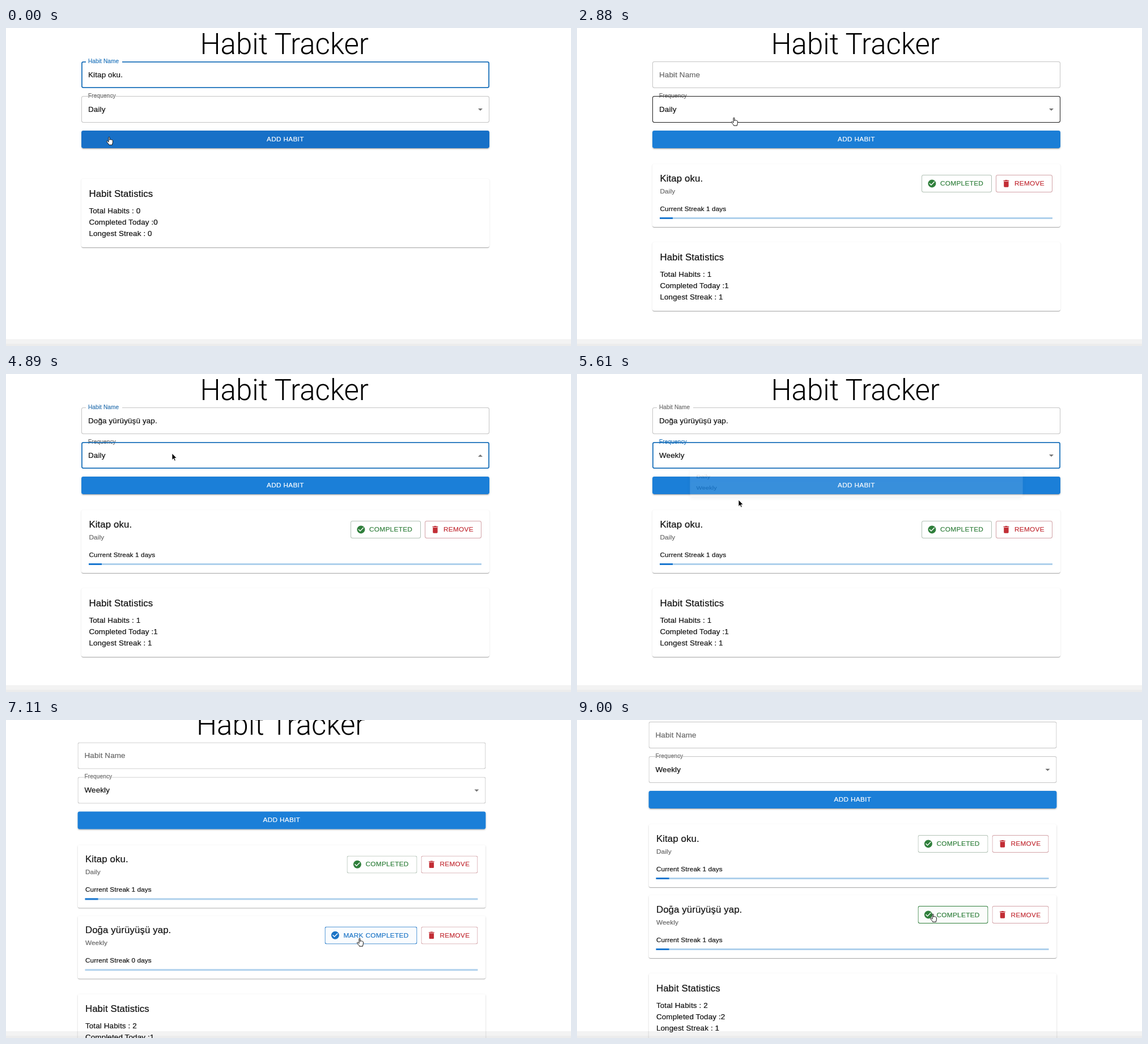
An HTML page for the animation above (9.6 s loop, 997x561 px).

```html
<!DOCTYPE html>
<html lang="en">
<head>
<meta charset="utf-8">
<title>Habit Tracker</title>
<style>
  html, body { margin: 0; width: 100%; height: 100%; overflow: hidden; background: #fff; }
  body { position: relative; font-family: "Liberation Sans", Arial, sans-serif; color: #101010; letter-spacing: .126px; }
  div, svg { position: absolute; }
  .text { line-height: 20px; margin-top: -10px; white-space: pre; -webkit-text-stroke: .2px currentColor; }
  .title { color: #000; font-family: Roboto, sans-serif; font-weight: 300; letter-spacing: 0; -webkit-text-stroke: 0; }
  .muted { color: #666; }
  .caps { letter-spacing: .336px; }
  .box { left: 133px; width: 720px; height: 47px; border-radius: 3.4px; }
  .card { left: 133px; width: 720px; border-radius: 3.4px; background: #fff;
    box-shadow: 0 1.7px .8px -.8px #0003, 0 .8px .8px #00000024, 0 .8px 2.5px #0000001f; }
  .button { height: 31px; border-radius: 3.4px; overflow: hidden; }
  .button svg { left: 10px; top: 7px; width: 16.8px; height: 16.8px; fill: currentColor; }
  .ripple { border-radius: 50%; background: currentColor; }
  .remove { left: 606px; top: 19.7px; width: 100px; color: #c22d35; box-shadow: inset 0 0 0 1px #d3a3a8; }
  .track { left: 13.4px; top: 94.2px; width: 693px; height: 3.4px; background: #aed0ec; }
  .fill { left: 0; top: 0; height: 100%; background: #1b78d0; }
  #add { left: 133px; top: 181px; width: 720px; color: #fff; }
  #addShadow { left: 133px; top: 181px; width: 720px; height: 31px; border-radius: 3.4px;
    box-shadow: 0 2.5px .8px -1.7px #0003, 0 1.7px 1.7px #00000024, 0 .8px 4.2px #0000001f; }
  #page { left: 0; top: 0; width: 997px; height: 700px; }
  #notch { left: 141px; top: 57px; height: 5px; background: #fff; }
  #nameLabel { left: 145px; font-size: 13.44px; transform-origin: 0 50%; }
  #caret { display: inline-block; position: relative; width: 1px; height: 15px; vertical-align: -3px; background: #222; }
  #arrow { left: 832.8px; top: 141.9px; border: 4.2px solid transparent; border-top-color: #757575; border-bottom: 0; }
  #menu { left: 133px; top: 167px; width: 720px; height: 74px; border-radius: 3.4px; background: #fff; transform-origin: 50% 0;
    box-shadow: 0 4.2px 4.2px -2.5px #0003, 0 6.7px 8.4px .8px #00000024, 0 2.5px 11.8px 1.7px #0000001f; }
  .item { left: 0; width: 100%; height: 30.2px; }
  #bar { left: 0; top: 549px; width: 100%; height: 8px; background: #0000000c; background-clip: padding-box; border-bottom: 4px solid #00000013; }
  #cursor { left: 0; top: 0; width: 24px; height: 24px; overflow: visible; }
</style>
</head>
<body>
<div id="page"></div>
<div id="bar"></div>
<svg id="cursor">
  <path id="hand" fill="#fff" stroke="#111" d="M-1 .9C-1 0 1 0 1 1.1V5.7l.3-.9c.6-.6 1.6-.3 1.8.4.5-.6 1.6-.3 1.8.5.6-.4 1.5 0 1.5.9V9.7c0 2-1 2.6-1 4.5H-.4C-.5 12.3-3.5 10.5-4.4 8.3-4.8 7.1-3.4 6.7-2.5 7.7L-1 9.2z"/>
  <path id="pointer" fill="#000" stroke="#fff" stroke-width=".8" d="M0 0V11.6L2.7 9.2 4.4 13.2 6.3 12.4 4.6 8.5H8.2Z"/>
  <path id="beam" fill="none" stroke="#222" d="M-2.5-6Q0-6 0-4Q0-6 2.5-6M0-4V5M-2.5 7Q0 7 0 5Q0 7 2.5 7"/>
</svg>
<script>
const LOOP = 9600;
const BLUE = '#1b7fd8', DARK_BLUE = '#1770c7', OUTLINE_BLUE = '#1a70ba', GREEN = '#2f7f3b';
const CHECK = 'M12 2a10 10 0 1 0 0 20 10 10 0 0 0 0-20zM10 17l-5-5 1.4-1.4 3.6 3.6 7.6-7.6L19 8z';
const TRASH = 'M6 19c0 1.1.9 2 2 2h8c1.1 0 2-.9 2-2V7H6zM19 4h-3.5l-1-1h-5l-1 1H5v2h14z';

// Event times in ms
const ADD = [180, 6250];
const DONE = [1720, 8400];
const NAME_FOCUS = 3130, TYPE_START = 3350, TYPE_END = 4450;
const SELECT_FOCUS = 4860, PICK = 5500;
const SCROLL_START = 6990, SCROLL_END = 7530;
const NEW_HABIT = 'Doğa yürüyüşü yap.';
const CARD_TOP = [239.5, 364.8], STATS_TOP = [266, 378, 503];

const cursorPath = [
  [0, 182, 192], [500, 182, 192], [1470, 641, 285], [1600, 645, 274], [2100, 645, 274],
  [2880, 277, 158], [3080, 250, 84], [4550, 250, 84], [4800, 293, 140], [5100, 293, 140],
  [5450, 285, 222], [5700, 285, 222], [6050, 300, 193], [6450, 300, 193], [7050, 624, 385],
  [7890, 624, 385], [8300, 628, 342], [LOOP, 628, 342]
];

const $ = id => document.getElementById(id);
const clamp = v => Math.max(0, Math.min(1, v));
const ramp = (t, from, length) => clamp((t - from) / length);
const pulse = (t, from, to, length) => clamp(ramp(t, from, length) - ramp(t, to, length));
const smooth = u => u * u * (3 - 2 * u);
const mix = (a, b, u) => `color-mix(in srgb, ${b} ${u * 100}%, ${a})`;
const show = (el, on) => { el.style.display = on ? '' : 'none'; };
const outline = (color, width = 1) => `inset 0 0 0 ${width}px ${color}`;

const text = (x, y, size, content, attrs = '', kind = '') =>
  `<div class="text ${kind}" ${attrs} style="left:${x}px;top:${y}px;font-size:${size}px">${content}</div>`;
const caps = (x, content, attrs) => text(x, 15.3, 11.76, content, attrs, 'caps');
const icon = d => `<svg viewBox="0 0 24 24"><path d="${d}"/></svg>`;

const habitCard = (name, frequency, i) => `
  <div class="card" id="card${i}" style="top:${CARD_TOP[i]}px;height:111.5px">
    ${text(13.4, 26.7, 16.8, name)}
    ${text(13.4, 48.7, 11.76, frequency, '', 'muted')}
    ${text(13.4, 79, 11.76, '', `id="streak${i}"`)}
    <div class="button" id="mark${i}" style="right:121px;top:19.7px">
      ${icon(CHECK)}${caps(33, '', `id="markText${i}"`)}<div class="ripple" id="markRipple${i}"></div>
    </div>
    <div class="button remove">${icon(TRASH)}${caps(33, 'REMOVE')}</div>
    <div class="track"><div class="fill" id="fill${i}"></div></div>
  </div>`;

$('page').innerHTML = `
  ${text(342.5, 29, 51, 'Habit Tracker', '', 'title')}
  <div class="box" id="nameBox" style="top:59px"></div>
  <div id="notch"></div>
  <div class="text" id="nameLabel">Habit Name</div>
  ${text(145, 83, 13.44, '<span id="nameText"></span><span id="caret"></span>')}
  ${text(145, 120, 10.08, 'Frequency', 'id="frequencyLabel"')}
  <div class="box" id="selectBox" style="top:120px"></div>
  ${text(145, 144, 13.44, '', 'id="frequency"')}
  <div id="arrow"></div>
  <div id="addShadow"></div>
  <div class="button" id="add">${caps(327, 'ADD HABIT')}<div class="ripple" id="addRipple"></div></div>
  ${habitCard('Kitap oku.', 'Daily', 0)}
  ${habitCard(NEW_HABIT, 'Weekly', 1)}
  <div class="card" id="stats" style="height:121px">
    ${text(13.4, 27, 16.8, 'Habit Statistics')}
    ${[0, 1, 2].map(i => text(13.4, 57 + i * 20.2, 13.44, '', `id="stat${i}"`)).join('')}
  </div>
  <div id="menu">
    <div class="item" style="top:6.7px;background:#e8f2fb">${text(13.4, 15.1, 13.44, 'Daily')}</div>
    <div class="item" id="weekly" style="top:36.9px">${text(13.4, 15.1, 13.44, 'Weekly')}</div>
  </div>`;

function cursorAt(t) {
  const i = cursorPath.findIndex(key => key[0] > t);
  const [t0, x0, y0] = cursorPath[i - 1], [t1, x1, y1] = cursorPath[i];
  const u = smooth((t - t0) / (t1 - t0));
  return [x0 + (x1 - x0) * u, y0 + (y1 - y0) * u];
}

function drawRipple(el, age, x, y, reach) {
  const r = reach * (1 - (1 - ramp(age, 0, 550)) ** 2);
  show(el, age >= 0 && age < 700);
  Object.assign(el.style, {
    left: x - r + 'px', top: y - r + 'px', width: 2 * r + 'px', height: 2 * r + 'px',
    opacity: .28 * (1 - ramp(age, 150, 500))
  });
}

function drawForm(t, target) {
  const nameFocused = t < ADD[0] - 60 || (t >= NAME_FOCUS && t < SELECT_FOCUS);
  const selectFocused = t >= SELECT_FOCUS && t < ADD[1] - 60;
  const typed = Math.floor(NEW_HABIT.length * ramp(t, TYPE_START, TYPE_END - TYPE_START));
  $('nameText').textContent = t < ADD[0] ? 'Kitap oku.' : t < ADD[1] ? NEW_HABIT.slice(0, typed) : '';
  const typing = t > TYPE_START && t < TYPE_END;
  show($('caret'), t >= NAME_FOCUS && t < SELECT_FOCUS && (typing || (t - NAME_FOCUS) % 1000 < 500));

  const shrink = smooth(clamp(1 - ramp(t, ADD[0], 200) + pulse(t, NAME_FOCUS, ADD[1], 200)));
  const label = $('nameLabel').style;
  label.top = 82.5 - 23.5 * shrink + 'px';
  label.transform = `scale(${1 - .25 * shrink})`;
  label.color = mix('#666', OUTLINE_BLUE, clamp(1 - ramp(t, ADD[0] - 60, 200) + pulse(t, NAME_FOCUS, SELECT_FOCUS, 200)));
  $('notch').style.width = 64 * shrink + 'px';

  const border = (focused, hovered) =>
    focused ? outline(OUTLINE_BLUE, 1.8) : outline(hovered ? '#1c1c1c' : '#c4c4c4');
  $('nameBox').style.boxShadow = border(nameFocused, target === 'name');
  $('selectBox').style.boxShadow = border(selectFocused, target === 'select');
  $('frequencyLabel').style.color = mix('#666', OUTLINE_BLUE, pulse(t, SELECT_FOCUS + 30, ADD[1] - 60, 200));
  $('frequency').textContent = t < PICK ? 'Daily' : 'Weekly';
  $('arrow').style.transform = t >= SELECT_FOCUS && t < PICK ? 'rotate(180deg)' : '';

  const hover = clamp(1 - ramp(t, 790, 250) + pulse(t, 2505, 2655, 250) + pulse(t, 5850, 6600, 250));
  $('add').style.background = mix(BLUE, DARK_BLUE, hover);
  const press = t < 3000 ? ADD[0] : ADD[1];
  drawRipple($('addRipple'), t - press + 60, press === ADD[0] ? 49 : 167, 12, 680);

  const closing = ramp(t, PICK, 150);
  const grown = t < PICK ? smooth(ramp(t, SELECT_FOCUS + 30, 210)) : 1 - closing;
  const scale = .75 + .25 * grown;
  $('menu').style.transform = `scale(${scale}, ${scale * scale})`;
  $('menu').style.opacity = t < PICK ? grown : grown ** 1.5;
  $('weekly').style.background = t > 5330 ? '#f5f5f5' : '';
}

function drawCard(i, t) {
  const done = t >= DONE[i];
  show($('card' + i), t >= ADD[i]);
  $('streak' + i).textContent = `Current Streak ${done ? 1 : 0} days`;
  $('fill' + i).style.width = 693 / 30 * ramp(t, DONE[i], 400) + 'px';
  $('markText' + i).textContent = done ? 'COMPLETED' : 'MARK COMPLETED';
  const hover = i ? clamp(pulse(t, 6850, 7250, 200) + ramp(t, 8080, 250)) : pulse(t, 1470, 2190, 250);
  const color = done ? GREEN : '#1b74c6';
  Object.assign($('mark' + i).style, {
    width: done ? '124px' : '163px',
    color,
    background: mix('#fff', color, hover * .02),
    boxShadow: outline(mix(done ? '#b3c2b6' : '#aec5da', color, hover))
  });
  drawRipple($('markRipple' + i), t - DONE[i] + 60, i ? 26 : 37, 14, 115);
}

function targetAt(x, y, t) {
  const inside = (left, top, right, bottom) => x >= left && x <= right && y >= top && y <= bottom;
  if (t >= SELECT_FOCUS && t < 5650) return '';
  if (inside(133, 59, 853, 106)) return 'name';
  if (inside(133, 120, 853, 167)) return 'select';
  if (inside(133, 181, 853, 212)) return 'button';
  const onCard = CARD_TOP.some((top, i) => t >= ADD[i] &&
    (inside(t < DONE[i] ? 569 : 608, top + 19.5, 732, top + 51) || inside(739, top + 19.5, 839, top + 51)));
  return onCard ? 'button' : '';
}

function render(t) {
  const shift = t >= ADD[1] ? -6.5 : 0;
  const scroll = 56 * (1 - (1 - ramp(t, SCROLL_START, SCROLL_END - SCROLL_START)) ** 1.7);
  $('page').style.transform = `translate(${shift}px, ${-scroll}px)`;

  const [x, y] = cursorAt(t);
  const target = targetAt(x - shift, y + scroll, t);
  drawForm(t, target);
  drawCard(0, t);
  drawCard(1, t);

  const habits = ADD.filter(time => t >= time).length;
  const completed = DONE.filter(time => t >= time).length;
  $('stats').style.top = STATS_TOP[habits] + 'px';
  $('stat0').textContent = `Total Habits : ${habits}`;
  $('stat1').textContent = `Completed Today :${completed}`;
  $('stat2').textContent = `Longest Streak : ${Math.min(1, completed)}`;

  $('cursor').style.transform = `translate(${x}px, ${y}px)`;
  show($('cursor'), t < TYPE_START || t > 4550);
  show($('hand'), target === 'select' || target === 'button');
  show($('pointer'), !target);
  show($('beam'), target === 'name');
}

const start = performance.now();
function tick() {
  render((performance.now() - start) % LOOP);
  requestAnimationFrame(tick);
}
tick();
</script>
</body>
</html>
```
